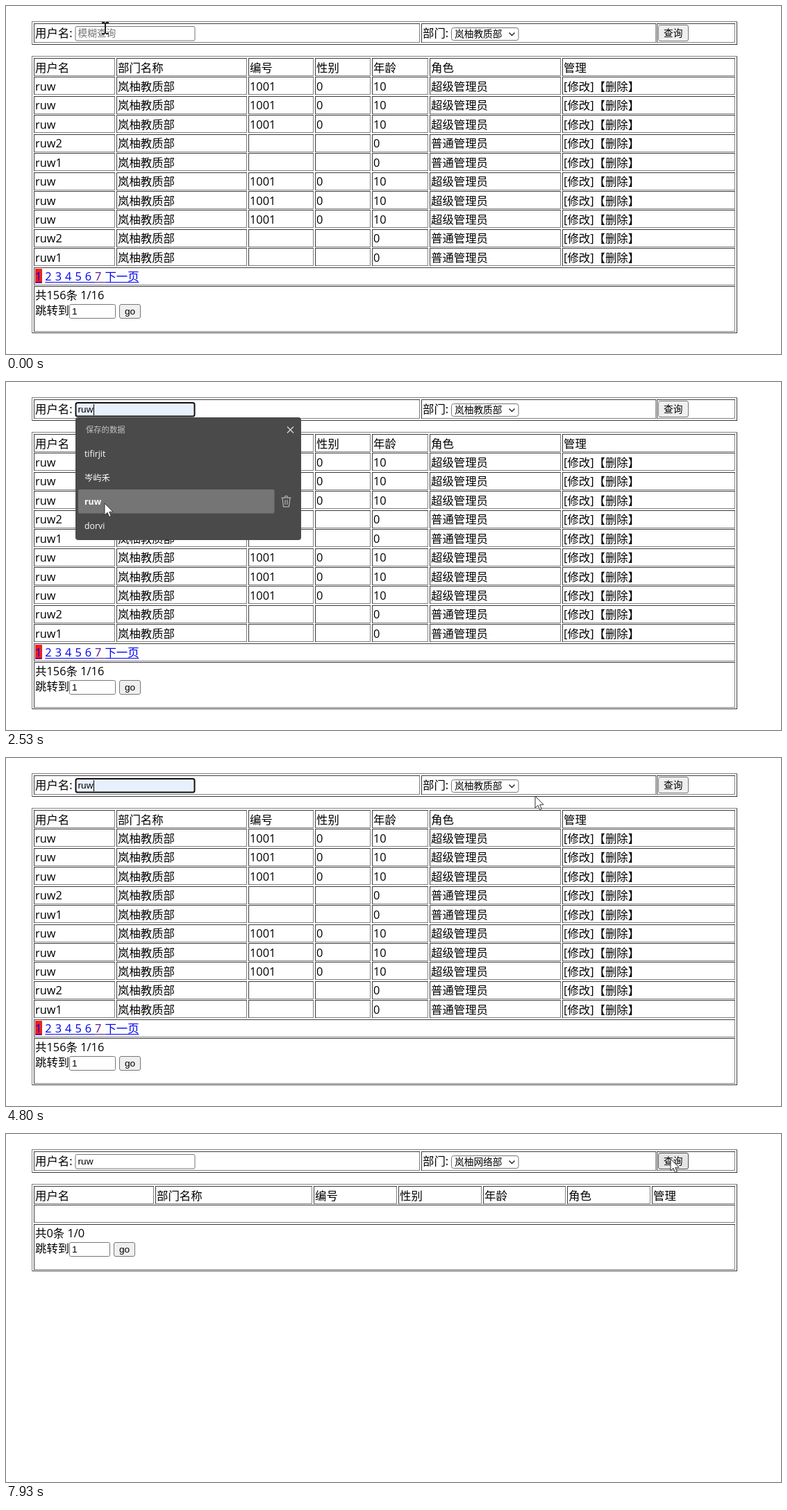
An HTML page with a canvas that plays this animation: 1116x502 px, repeating every 8 s.

```html
<!DOCTYPE html>
<html lang="zh-CN">
<head>
<meta charset="utf-8">
<title>用户查询</title>
<style>
html, body { margin: 0; width: 100%; height: 100%; overflow: hidden; background: #fff; }
canvas { display: block; width: 1116px; height: 502px; }
</style>
</head>
<body>
<canvas id="stage" width="1116" height="502"></canvas>
<script>
const ctx = document.getElementById('stage').getContext('2d');
const LOOP = 8000, TICK = 200 / 3;
const UI = '"Open Sans", "Noto Sans CJK SC", "Noto Sans CJK", sans-serif';
const FORM = '"Liberation Sans", "Noto Sans CJK SC", "Noto Sans CJK", sans-serif';
const GRAY = '#808080', DARK = '#3a3a3a', BORDER = '#767676';

const USER = 'ruw';
const DEPTS = ['岚柚教质部', '岚柚网络部', '岚柚咨询部', '岚柚市场部'];
const SAVED = ['tifirjit', '岑屿禾', USER, 'dorvi'];
const HEADS = ['用户名', '部门名称', '编号', '性别', '年龄', '角色', '管理'];
const COLS = [40, 159, 349, 445, 527, 610, 801];
const EMPTY_COLS = [40, 215, 443, 565, 687, 808, 930];
const ROW_TOP = 75, ROW_STEP = 27.43;

// time, x, y of the pointer
const PATH = [
  [0, 143, 32], [267, 159, 42], [1200, 159, 42], [1467, 168, 48],
  [1733, 168, 48], [1933, 132, 210], [2000, 134, 222], [2200, 142, 175],
  [2667, 142, 175], [3067, 708, 41], [3333, 746, 40], [3600, 749, 44],
  [3867, 749, 44], [4400, 960, 38], [4600, 960, 38], [4800, 762, 55],
  [5200, 690, 40], [5533, 690, 40], [5733, 700, 98], [5867, 700, 98],
  [5933, 701, 80], [6000, 701, 96], [6400, 701, 96], [6467, 701, 122],
  [6533, 702, 108], [6867, 702, 108], [7333, 957, 36], [8000, 957, 36]
];
const CARET_ON = [[467, 925], [1430, 1970], [2530, 2990], [3470, 3970], [4400, 4900], [5260, 5330]];

const within = (t, a, b) => t >= a && t < b;

function pointerAt(t) {
  const i = Math.max(1, PATH.findIndex(p => p[0] >= t));
  const [t0, x0, y0] = PATH[i - 1], [t1, x1, y1] = PATH[i];
  const k = (t - t0) / (t1 - t0), e = k * k * (3 - 2 * k);
  return [x0 + (x1 - x0) * e, y0 + (y1 - y0) * e];
}

function text(s, x, y, size = 16.4, color = '#000', family = UI, weight = 400) {
  ctx.font = `${weight} ${size}px ${family}`;
  ctx.fillStyle = color;
  ctx.fillText(s, x, y);
}

function rect(x, y, w, h, color) {
  ctx.fillStyle = color;
  ctx.fillRect(x, y, w, h);
}

function line(points, color, width = 1) {
  ctx.beginPath();
  points.forEach(([x, y]) => ctx.lineTo(x, y));
  ctx.strokeStyle = color;
  ctx.lineWidth = width;
  ctx.stroke();
}

function rounded(x0, y0, x1, y1, r, fill, stroke, width = 1) {
  ctx.beginPath();
  ctx.roundRect(x0, y0, x1 - x0, y1 - y0, r);
  if (fill) { ctx.fillStyle = fill; ctx.fill(); }
  if (stroke) { ctx.strokeStyle = stroke; ctx.lineWidth = width; ctx.stroke(); }
}

function bevel(x0, y0, x1, y1, topLeft, bottomRight) {
  [x0, y0, x1, y1] = [x0, y0, x1, y1].map(Math.round);
  rect(x0, y1 - 1, x1 - x0, 1, bottomRight);
  rect(x1 - 1, y0, 1, y1 - y0, bottomRight);
  rect(x0, y0, x1 - x0, 1, topLeft);
  rect(x0, y0, 1, y1 - y0, topLeft);
}
const frame = (y0, y1) => bevel(37, y0, 1053, y1, GRAY, DARK);
const cell = (x0, y0, x1, y1) => bevel(x0, y0, x1, y1, DARK, GRAY);

function tableRow(k, cols, labels) {
  const y = ROW_TOP + ROW_STEP * k;
  cols.forEach((x, i) => {
    cell(x, y, i < cols.length - 1 ? cols[i + 1] - 2 : 1050, y + 26);
    text(labels[i] || '', x + 2, y + 19.6);
  });
}

function button(label, x0, y0, x1, y1, tx, ty, fill = '#efefef', stroke = BORDER) {
  rounded(x0 + .5, y0 + .5, x1 - .5, y1 - .5, 2.5, fill, stroke);
  text(label, tx, ty, 13.7, '#000', FORM);
}

function footer(y, summary, inputRight) {
  cell(40, y, 1050, y + 66);
  text(summary, 42, y + 19);
  text('跳转到', 42, y + 41);
  rounded(91.5, y + 26.5, inputRight - .5, y + 46.5, 2, '#fff', BORDER);
  text('1', 95, y + 41, 13.7, '#000', FORM);
  button('go', inputRight + 5, y + 26, inputRight + 36, y + 47, inputRight + 13, y + 41);
}

function fullTable() {
  frame(72, 472);
  tableRow(0, COLS, HEADS);
  for (let k = 0; k < 10; k++) {
    const n = k % 5, top = n < 3;
    tableRow(k + 1, COLS, [
      top ? USER : USER + (5 - n), DEPTS[0], top ? '1001' : '', top ? '0' : '',
      top ? '10' : '0', top ? '超级管理员' : '普通管理员', '[修改]【删除】'
    ]);
  }
  cell(40, 377, 1050, 403);
  rect(42, 379, 10, 21, '#ee2020');
  ['1', '2', '3', '4', '5', '6', '7', '下一页'].forEach((s, i) => {
    const x = 42 + 14.35 * i, color = i === 6 ? '#551a8b' : '#0000ee';
    text(s, x, 396, 16.4, color);
    rect(x, 398, i === 7 ? 49 : i ? 14.35 : 9.5, 1, color);
  });
  footer(404, '共156条 1/16', 158);
}

function emptyTable() {
  frame(72, 198);
  tableRow(0, EMPTY_COLS, HEADS);
  cell(40, 102, 1050, 128);
  footer(130, '共0条 1/0', 150);
}

function searchForm(t, overButton) {
  const done = t >= 7730, focused = within(t, 465, 5330);
  const filled = t >= 2065, committed = t >= 2530;
  frame(22, 56);
  [[40, 596], [598, 936], [937, 1050]].forEach(([a, b]) => cell(a, 25, b, 53));
  text('用户名:', 42, 44.5);
  text('部门:', 600, 45);

  const fill = filled && !done ? '#e8f0fe' : '#fff';
  if (focused) rounded(100.5, 30, 271.5, 49.5, 2.5, fill, '#101010', 2);
  else rounded(100, 29.5, 272, 50, 2, fill, BORDER);
  text(filled ? USER : '模糊查询', 103.5, 44.3, 13.7, filled ? '#000' : '#757575', FORM);
  if (CARET_ON.some(([a, b]) => within(t, a, b))) rect(committed ? 126 : 103, 32, 1, 16, '#000');

  const ring = within(t, 6860, 7600);
  rounded(641.5, 31.5, 738, 49.5, 3, '#fff', ring ? '#101010' : BORDER, ring ? 2 : 1);
  text(DEPTS[t >= 6860 ? 1 : 0], 646, 45.3, 13.7, '#000', FORM);
  line([[724.5, 38.5], [728.5, 42.5], [732.5, 38.5]], '#222', 1.4);

  const pressed = within(t, 7600, 7700);
  button('查询', 939, 27, 983, 51, 947, 44.4,
    pressed ? '#f5f5f5' : overButton ? '#e5e5e5' : '#efefef', overButton ? '#4f4f4f' : BORDER);
}

function trash(x, y) {
  line([[x, y + 3], [x + 14, y + 3]], '#c8c8c8');
  line([[x + 4.5, y + 3], [x + 5.5, y + .5], [x + 8.5, y + .5], [x + 9.5, y + 3]], '#c8c8c8');
  line([[x + 1.5, y + 3], [x + 3, y + 16], [x + 11, y + 16], [x + 12.5, y + 3]], '#c8c8c8');
  line([[x + 5.5, y + 6], [x + 5.5, y + 13]], '#c8c8c8');
  line([[x + 8.5, y + 6], [x + 8.5, y + 13]], '#c8c8c8');
}

function savedList(t) {
  if (!within(t, 465, 2730)) return;
  const moving = t < 530 || t >= 2660;
  const active = t < 1860 ? -1 : t < 1990 ? 0 : t < 2060 ? 3 : 2;
  ctx.save();
  ctx.globalAlpha = moving ? .52 : t >= 2600 ? .85 : 1;
  if (moving) rounded(104, 53, 423, 228, 2, '#4a4a4a');
  else rounded(100, 51, 425, 228, 4, '#4a4a4a');
  if (moving) {
    ctx.clip();
    ctx.translate(4, 2);
  }
  text('保存的数据', 115, 73, 11.3, '#c4c4c4');
  line([[405, 64.5], [414, 73.5]], '#e4e4e4', 1.1);
  line([[414, 64.5], [405, 73.5]], '#e4e4e4', 1.1);
  SAVED.forEach((name, i) => {
    const y = 86 + 34.5 * i, on = i === active;
    if (on) {
      rounded(104, y, 386.5, y + 34.5, 2, '#757575');
      trash(396.5, y + 9);
    }
    text(name, 113, y + 22, 12.3, '#fff', UI, on ? 700 : 400);
  });
  ctx.restore();
}

function deptList(t, y) {
  if (!within(t, 5330, 6860)) return;
  const active = t < 5600 ? 0 : Math.max(0, Math.min(3, Math.floor((y - 55) / 32)));
  ctx.save();
  if (t < 5395) ctx.globalAlpha = .5;
  rounded(641.5, 51.5, 738.5, 187.5, 3, '#fff', '#c6c6c6');
  DEPTS.forEach((name, i) => {
    const top = 55 + 32 * i;
    if (i === active) rect(642, top, 96, 32, '#e6e6e6');
    text(name, 650, top + 21, 13.7, '#111', FORM);
  });
  ctx.restore();
}

function arrow(x, y) {
  ctx.beginPath();
  [[0, 0], [0, 17], [4, 13.3], [6.7, 19.5], [9.3, 18.4], [6.7, 12.4], [12, 12.2]]
    .forEach(([dx, dy]) => ctx.lineTo(x + dx, y + dy));
  ctx.closePath();
  ctx.fillStyle = '#fff';
  ctx.fill();
  ctx.strokeStyle = '#333';
  ctx.lineWidth = 1;
  ctx.stroke();
}

function textCursor(x, y) {
  x = Math.round(x);
  y = Math.round(y);
  rect(x - 1, y - 8, 2, 16, '#222');
  for (const dy of [-9, 7]) {
    rect(x - 5, y + dy, 4, 2, '#222');
    rect(x + 1, y + dy, 4, 2, '#222');
  }
}

function draw(t) {
  const [x, y] = pointerAt(t);
  const overButton = within(x, 939, 983) && within(y, 27, 51);
  rect(0, 0, 1116, 502, '#fff');
  searchForm(t, overButton);
  if (t < 7730) fullTable(); else emptyTable();
  savedList(t);
  deptList(t, y);
  if (t < 1795) textCursor(x, y); else arrow(x, y);
}

const start = performance.now();
function loop() {
  const t = (performance.now() - start) % LOOP;
  draw(Math.min(LOOP - 1, Math.floor((t + 4) / TICK) * TICK));
  requestAnimationFrame(loop);
}
loop();
</script>
</body>
</html>
```
